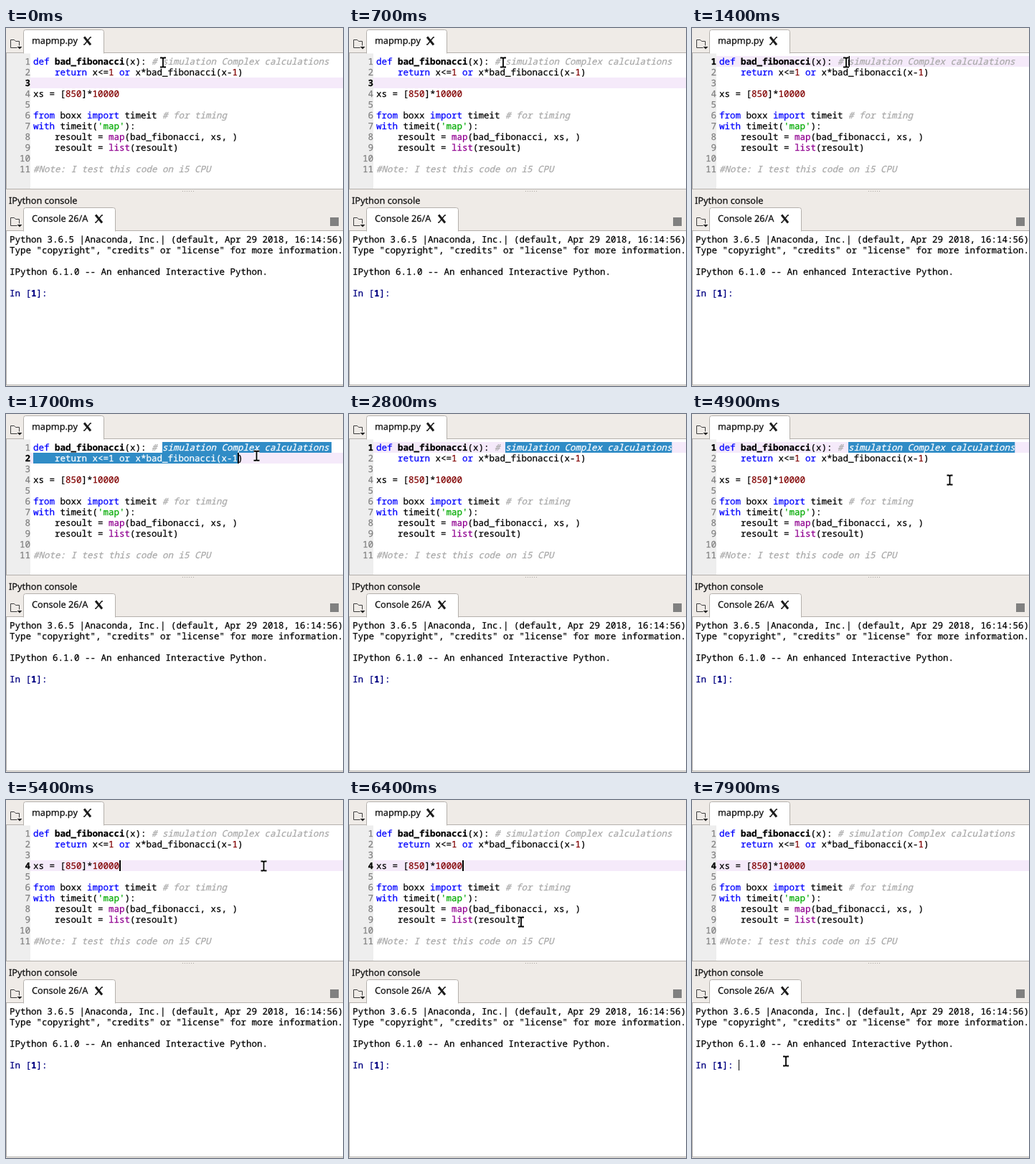
An HTML page with a canvas that plays this animation: 470 by 499 pixels, repeating every 8000 ms.

```html
<!DOCTYPE html>
<html lang="en">
<head>
<meta charset="utf-8">
<title>Editor and console</title>
<style>
html, body { margin: 0; width: 100%; height: 100%; overflow: hidden; background: #efebe7; }
canvas { display: block; }
</style>
</head>
<body>
<canvas id="stage" width="470" height="499"></canvas>
<script>
const c = document.getElementById('stage').getContext('2d');
const LOOP = 8000, STEP = 100, CHAR = 7.5, ROW = 15, LEFT = 38, TOP = 39, ANCHOR = 24;
const PRESS = 1400, RELEASE = 2000, TRIM = 2800, CLICK = 5200, LEAVE = 6900;
const MONO = '12.5px "Noto Sans Mono", "DejaVu Sans Mono", monospace';
const UI = '12.7px "Noto Sans", "Open Sans", sans-serif';
const BORDER = '#b4b0ac';

const code = `def bad_fibonacci(x): # simulation Complex calculations
    return x<=1 or x*bad_fibonacci(x-1)

xs = [850]*10000

from boxx import timeit # for timing
with timeit('map'):
    resoult = map(bad_fibonacci, xs, )
    resoult = list(resoult)

#Note: I test this code on i5 CPU`.split('\n');

const banner = `Python 3.6.5 |Anaconda, Inc.| (default, Apr 29 2018, 16:14:56)
Type "copyright", "credits" or "license" for more information.

IPython 6.1.0 -- An enhanced Interactive Python.`.split('\n');

const token = /(?<comment>#.*)|(?<string>'[^']*')|(?<name>(?<=def )\w+)|(?<keyword>\b(?:def|return|or|from|import|with)\b)|(?<builtin>\b(?:map|list)\b)|(?<number>\b\d+\b)|[^#'\w]+|\w+/g;
const colors = { comment: '#a8a8a8', string: '#00aa00', name: '#000', keyword: '#0000ff', builtin: '#900090', number: '#800000' };
const fonts = { comment: 'italic ', name: 'bold ' };

const smooth = p => p * p * (3 - 2 * p);
const easeIn = p => p ** 1.5;
const easeOut = p => 1 - (1 - p) ** 2;

// The pointer rests between these moves.
const start = { x: 219, y: 48 };
const moves = [
  { from: 600, to: 700, x: 215, y: 48 },
  { from: PRESS, to: RELEASE, x: 484, y: 68.5 },
  { from: 3300, to: 3600, x: 364, y: 90 },
  { from: 3800, to: 4400, x: 359.5, y: 92 },
  { from: 5700, to: 6100, x: 365, y: 102 },
  { from: 6200, to: 6400, x: 240, y: 170, ease: easeIn },
  { from: 6400, to: 7100, x: 131, y: 364, ease: easeOut },
];

function pointer(t) {
  let { x, y } = start;
  for (const m of moves) {
    if (t <= m.from) break;
    const p = (m.ease || smooth)(Math.min(1, (t - m.from) / (m.to - m.from)));
    x += (m.x - x) * p;
    y += (m.y - y) * p;
  }
  return { x, y };
}

function caretAt(t) {
  if (t < PRESS) return { row: 2, col: 0 };
  if (t >= CLICK) return { row: 3, col: code[3].length };
  if (t >= TRIM) return { row: 0, col: code[0].length };
  // While dragging, the caret trails the pointer slightly.
  const { x, y } = pointer(t - 40);
  const row = Math.floor((y - TOP) / ROW);
  const col = Math.max(ANCHOR, Math.round((x - LEFT) / CHAR));
  return { row, col: Math.min(col, code[row].length) };
}

const blink = (t, since) => t >= since && (t - since) % 1000 < 500;

function editorCaretOn(t) {
  if (t < TRIM) return t >= PRESS && t < 2300;
  return t < LEAVE && blink(t, 3400);
}

function rect(x, y, w, h, color) {
  c.fillStyle = color;
  c.fillRect(x, y, w, h);
}

function text(s, x, y, color = '#000', font = MONO) {
  c.font = font;
  c.fillStyle = c.strokeStyle = color;
  c.lineWidth = 0.25;
  c.fillText(s, x, y);
  c.strokeText(s, x, y);
}

function strokes(d, color, width) {
  c.strokeStyle = color;
  c.lineWidth = width;
  c.stroke(new Path2D(d));
}

function codeLine(row, color) {
  for (const m of code[row].matchAll(token)) {
    const kind = Object.keys(m.groups).find(k => m.groups[k]);
    text(m[0], LEFT + m.index * CHAR, TOP + 12 + row * ROW,
      color || colors[kind] || '#000', (fonts[kind] || '') + MONO);
  }
}

function select(row, x0, x1) {
  const y = TOP + row * ROW;
  c.save();
  c.beginPath();
  c.rect(x0, y, x1 - x0, ROW);
  c.clip();
  rect(x0, y, x1 - x0, ROW, '#308cc6');
  codeLine(row, '#fff');
  c.restore();
}

function closeMark(x, y) {
  strokes(`M${x - 4.5} ${y - 5.5}L${x + 4.5} ${y + 5.5}`, '#1c1c1c', 3);
  strokes(`M${x + 5.5} ${y - 5}h-1.5L${x - 4} ${y + 5}h-1.5`, '#1c1c1c', 1.5);
}

function folder(x, y) {
  strokes(`M${x + 9} ${y + 11}H${x}V${y}H${x + 5}l2 2H${x + 12}V${y + 8}`, '#3c3c3c', 1);
  c.fillStyle = '#222';
  c.fill(new Path2D(`M${x + 9} ${y + 9.5}h7l-3.5 3.5z`));
}

function tabBar(y, right, label) {
  const base = y + 32.5;
  strokes(`M0 ${base}H470`, BORDER, 1);
  c.fillStyle = '#fff';
  const tab = `M24.5 ${base + 1}V${y + 3.5}q0 -3 3 -3H${right - 2.5}q3 0 3 3V${base + 1}`;
  c.fill(new Path2D(tab));
  strokes(tab, BORDER, 1);
  text(label, 36, y + 20, '#111', UI);
  closeMark(right - 22.5, y + 16);
  folder(6.5, y + 14.5);
}

function editor(t) {
  const { row, col } = caretAt(t);
  const caretX = LEFT + col * CHAR, y = TOP + row * ROW;
  rect(0, 35, 470, 189, '#fff');
  rect(1, 35, 33, 189, '#eeeeee');
  rect(34, y, 436, ROW, '#f5eafa');
  code.forEach((line, i) => {
    const n = String(i + 1), current = i === row;
    text(n, 34 - n.length * CHAR, TOP + 12 + i * ROW,
      current ? '#000' : '#808080', (current ? 'bold ' : '') + MONO);
    codeLine(i);
  });
  if (t >= PRESS && t < CLICK) {
    select(0, LEFT + ANCHOR * CHAR, row ? 454 : caretX);
    if (row) select(1, LEFT, caretX);
  }
  if (editorCaretOn(t)) rect(Math.round(caretX), y, 2, ROW, '#000');
  rect(0, 35, 1, 189, BORDER);
  rect(0, 224, 470, 1, BORDER);
}

function consolePane(t) {
  for (let i = 0; i < 6; i++) rect(246 + i * 3, 227, 1, 1, '#aaa6a2');
  text('IPython console', 4, 245, '#111', UI);
  rect(0, 283, 470, 215, '#fff');
  tabBar(250, 152, 'Console 26/A');
  rect(452, 264, 12, 12, '#808080');
  rect(0, 283, 1, 215, BORDER);
  rect(0, 497, 470, 1, BORDER);
  banner.forEach((line, i) => text(line, 5, 299 + i * ROW));
  text('In [', 5, 374, '#000080');
  text('1', 5 + 4 * CHAR, 374, '#000080', 'bold ' + MONO);
  text(']:', 5 + 5 * CHAR, 374, '#000080');
  if (blink(t, LEAVE)) rect(65, 362, 1, ROW, '#000');
}

function beam({ x, y }) {
  const d = `M${x - 4} ${y - 6.5}h3l1 1l1 -1h3M${x} ${y - 6}v12M${x - 4} ${y + 6.5}h3l1 -1l1 1h3`;
  strokes(d, '#fff', 4);
  strokes(d, '#000', 1.8);
}

function draw(now) {
  const t = Math.floor(now % LOOP / STEP) * STEP;
  c.textRendering = 'geometricPrecision';
  c.lineJoin = 'round';
  rect(0, 0, 470, 499, '#efebe7');
  editor(t);
  tabBar(2, 136, 'mapmp.py');
  consolePane(t);
  beam(pointer(t));
  requestAnimationFrame(draw);
}
requestAnimationFrame(draw);
</script>
</body>
</html>
```
